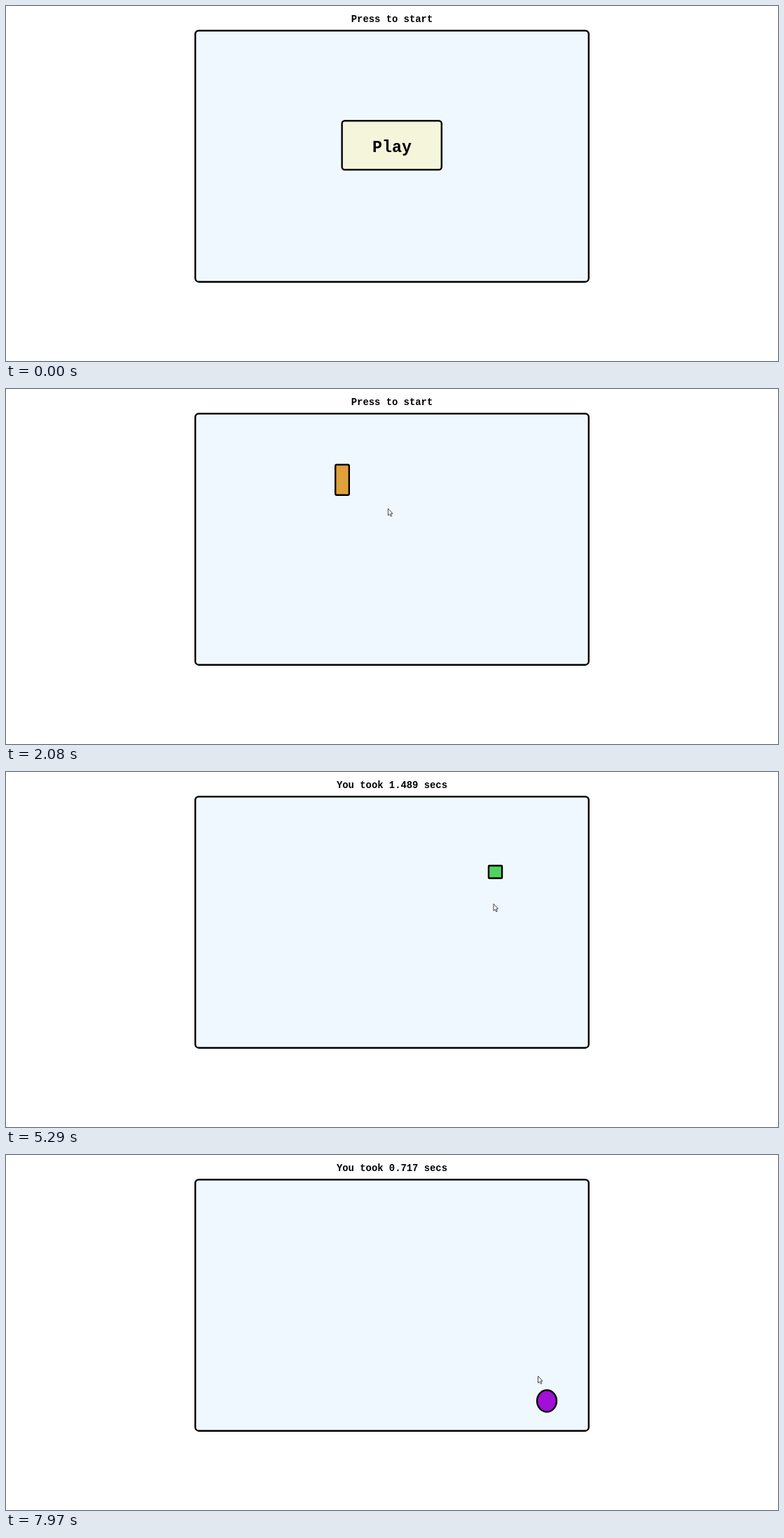
An HTML page that plays this animation: 1102 by 508 pixels, repeating every 8 s.

```html
<!DOCTYPE html>
<html lang="en">
<head>
<meta charset="utf-8">
<title>Reaction game</title>
<style>
  html, body { margin: 0; width: 100%; height: 100%; overflow: hidden; background: #fff; }
  svg { display: block; width: 100%; height: 100%; }
  text { font-family: "Courier New", "Liberation Mono", monospace; font-weight: bold; text-anchor: middle; }
  .box { stroke: #000; stroke-width: 2.4; }
  .cursor { fill: #fff; stroke: #333; stroke-width: .9; stroke-linejoin: round; }
</style>
</head>
<body>
<svg viewBox="0 0 1102 508">
  <rect class="box" x="270.2" y="35.2" width="561.6" height="359.5" rx="5" fill="#f0f8ff"/>
  <text id="title" x="551" y="23" font-size="13.87"></text>
  <g id="play">
    <rect class="box" x="479.6" y="164.2" width="142.2" height="70" rx="4" fill="#f5f5dc"/>
    <text x="551" y="209" font-size="23.3">Play</text>
  </g>
  <rect id="shape" class="box"/>
  <g id="pointer">
    <path id="arrow" class="cursor" d="M.5 .3V10.2L2.7 8.2L4.2 11.6L5.8 10.9L4.3 7.6H7Z"/>
    <path id="hand" class="cursor" d="M-1 1.2Q0 -.4 1 1.2V5.4Q2 4.7 2.8 5.7Q4 5.2 4.6 6.2Q6 5.9 6.2 7.3V10Q6 12 4.9 13.8H-.3Q-1.4 11.6-3.6 9.6Q-4.6 8.2-3.6 7.6Q-2.5 7.2-1 9Z"/>
    <circle id="press" cy=".5" r="9" fill="#ff0" fill-opacity=".52"/>
  </g>
</svg>
<script>
const LOOP = 8000;
const FIRST_CLICK = 1640;
const MS_PER_SEC = 980;   // playback runs slightly faster than the game clock
const $ = id => document.getElementById(id);
const show = (id, on) => $(id).setAttribute("visibility", on ? "visible" : "hidden");

function setAttrs(id, attrs) {
  for (const k in attrs) $(id).setAttribute(k, attrs[k]);
}

// Each target: centre, size, corner radius, colour, reaction time
const targets = [
  { x: 480, y: 130, w: 22, h: 46, r: 2, fill: "#e0a03c", secs: 1.071 },
  { x: 432, y: 230, w: 36, h: 36, r: 13, fill: "#1a36ad", secs: 1.489 },
  { x: 698.5, y: 143, w: 21.5, h: 20.3, r: 1, fill: "#4fd360", secs: 1.851 },
  { x: 513, y: 318, w: 38, h: 40, r: 6, fill: "#3aa8b8", secs: 0.819 },
  { x: 609, y: 106, w: 22, h: 54, r: 0, fill: "#ea92d2", secs: 0.717 },
  { x: 772, y: 352, w: 30.3, h: 33.5, r: 50, fill: "#a010d6" }
];

// A target appears when the one before it is clicked
let clock = FIRST_CLICK;
for (const target of targets) {
  target.at = clock;
  clock += target.secs * MS_PER_SEC;
}

// Pointer strokes: when, where to, and how far the path bows sideways
const entry = { x: 1049, y: 506 };
const moves = [
  { from: 240, to: 1330, x: 586, y: 194, bow: -.08 },
  { from: 1990, to: 2390, x: 473, y: 130 },
  { from: 2920, to: 3270, x: 448, y: 214, bow: -.1 },
  { from: 3500, to: 3740, x: 437, y: 227 },
  { from: 4380, to: 5200, x: 693, y: 205, bow: .18 },
  { from: 5200, to: 5680, x: 701, y: 151 },
  { from: 6000, to: 6640, x: 520, y: 310 },
  { from: 6780, to: 7280, x: 617, y: 115.5, bow: .07 },
  { from: 7550, to: 7970, x: 759, y: 316 }
];

const easeOut = u => 1 - (1 - u) ** 1.75;

function tip(t) {
  let { x, y } = entry;
  for (const m of moves) {
    if (t < m.from) break;
    const u = easeOut(Math.min(1, (t - m.from) / (m.to - m.from)));
    const side = (m.bow || 0) * Math.sin(Math.PI * u);
    const dx = m.x - x, dy = m.y - y;
    x += dx * u - dy * side;
    y += dy * u + dx * side;
  }
  return { x, y };
}

function draw(t) {
  const shown = targets.filter(s => s.at <= t);
  const target = shown.pop(), hit = shown.pop();
  $("title").textContent = hit ? `You took ${hit.secs.toFixed(3)} secs` : "Press to start";
  show("play", !target);
  show("shape", target);
  if (target) {
    const width = target.w - 2.4, height = target.h - 2.4;
    setAttrs("shape", {
      x: target.x - width / 2, y: target.y - height / 2, width, height,
      rx: target.r, ry: target.r, fill: target.fill
    });
  }

  const { x, y } = tip(t);
  const visible = t >= moves[0].from;
  const overPlay = !target && x < 623 && y < 236;
  setAttrs("pointer", { transform: `translate(${x} ${y})` });
  show("arrow", visible && !overPlay);
  show("hand", visible && overPlay);
  show("press", targets.some(s => t > s.at - 115 && t < s.at + 30));
}

const start = performance.now();
function tick() {
  draw((performance.now() - start) % LOOP);
  requestAnimationFrame(tick);
}
tick();
</script>
</body>
</html>
```
